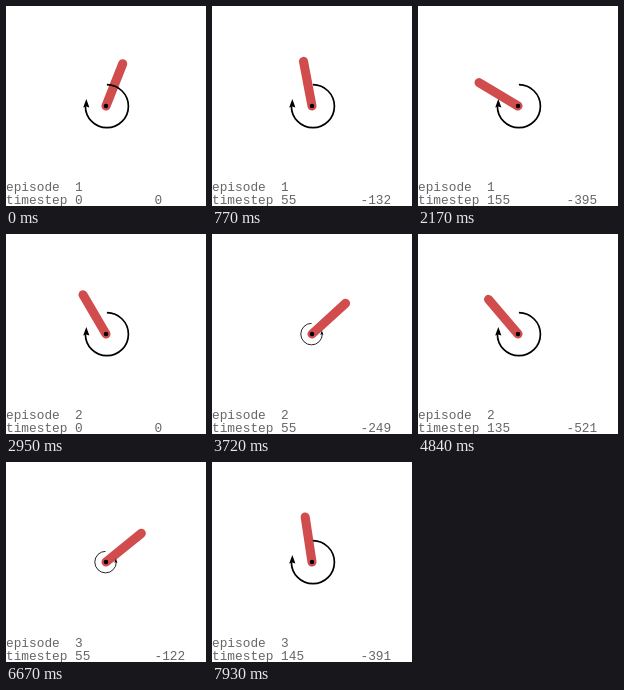
An HTML page with a canvas that plays this animation: 200 by 200 pixels, repeating every 8000 ms.

```html
<!DOCTYPE html>
<html lang="en">
<head>
<meta charset="utf-8">
<title>Pendulum</title>
<style>
  html, body { margin: 0; width: 100%; height: 100%; overflow: hidden; background: #fff; }
  canvas { display: block; width: 200px; height: 200px; }
</style>
</head>
<body>
<canvas id="stage"></canvas>
<script>
const SIZE = 200, MID = 100, UNIT = SIZE / 4.4;
const LOOP = 8000, EPISODE = 2950, TICK = 70, STRIDE = 5, LAST = 195;
const DWELL = 0.25, TURN = 2 * Math.PI, SUB = 20;

// Waypoints per episode: timestep, angle, turns, total reward
const EPISODES = [
  [[0, -0.377, 0, 0], [110, 0.44, 2, -262], [195, 1.28, 4]],
  [[0, 0.53, 0, 0], [55, -0.83, 2, -249], [135, 0.706, 4, -521], [195, 1.28, 5]],
  [[0, -0.4, 0, 0], [55, -0.89, 1, -122], [145, 0.15, 3, -391]]
];

const wrap = a => a - TURN * Math.round(a / TURN);
const clamp = (x, lo, hi) => Math.min(hi, Math.max(lo, x));
const angleOf = p => p[1] + p[2] * TURN;

// Swing speed of a rod that crosses the top at speed v
const speed = (a, v) => Math.sqrt(v * v + 60 * Math.sin((a - DWELL) / 2) ** 2);

function swing(from, steps, v) {
  const h = 0.05 / SUB, path = [from];
  let a = from;
  for (let i = 1; i <= steps * SUB; i++) {
    a += h * speed(a + h / 2 * speed(a, v), v);
    if (i % SUB === 0) path.push(a);
  }
  return { path, v };
}

function fit(from, to, steps) {
  let lo = 0, hi = 8;
  for (let i = 0; i < 44; i++) {
    const v = (lo + hi) / 2;
    if (swing(from, steps, v).path[steps] < to) lo = v; else hi = v;
  }
  return swing(from, steps, (lo + hi) / 2);
}

const cost = (a, v) => wrap(a) ** 2 + 0.1 * speed(a, v) ** 2 + 0.002;

function simulate(points) {
  const states = [{ angle: angleOf(points[0]), reward: 0 }];
  for (let i = 1; i < points.length; i++) {
    const p = points[i - 1], q = points[i];
    const { path, v } = fit(angleOf(p), angleOf(q), q[0] - p[0]);
    const costs = path.slice(0, -1).map(a => cost(a, v));
    const sum = costs.reduce((x, y) => x + y, 0);
    const gain = q[3] === undefined ? 1 : (p[3] - q[3]) / sum;
    let reward = p[3];
    costs.forEach((c, k) => {
      reward -= c * gain;
      states.push({ angle: path[k + 1], reward });
    });
  }
  return states;
}

const runs = EPISODES.map(simulate);
const torque = a => clamp(Math.round(-3 * (wrap(a) + 0.53)), -2, 2);

const canvas = document.getElementById("stage");
const ratio = window.devicePixelRatio || 1;
canvas.width = canvas.height = SIZE * ratio;
const ctx = canvas.getContext("2d");

function drawRod(angle) {
  ctx.strokeStyle = "#d14c4c";
  ctx.lineWidth = 0.2 * UNIT;
  ctx.lineCap = "round";
  ctx.beginPath();
  ctx.moveTo(MID, MID);
  ctx.lineTo(MID - UNIT * Math.sin(angle), MID - UNIT * Math.cos(angle));
  ctx.stroke();
  ctx.fillStyle = "#000";
  ctx.beginPath();
  ctx.arc(MID, MID, 0.05 * UNIT, 0, TURN);
  ctx.fill();
}

function drawArrow(u) {
  if (!u) return;
  ctx.save();
  ctx.translate(MID, MID);
  ctx.scale(-u / 2, Math.abs(u) / 2);
  ctx.strokeStyle = ctx.fillStyle = "#000";
  ctx.lineWidth = 1.7;
  ctx.lineCap = "butt";
  ctx.beginPath();
  ctx.arc(0.9, 0.2, 21.5, -Math.PI / 2, Math.PI);
  ctx.stroke();
  ctx.beginPath();
  ctx.moveTo(-19.7, -7);
  ctx.lineTo(-16.6, 1.4);
  ctx.lineTo(-19.8, 0.4);
  ctx.lineTo(-22.8, 1.6);
  ctx.fill();
  ctx.restore();
}

function drawText(episode, step, reward) {
  ctx.fillStyle = "#666";
  ctx.font = '12.8px "Liberation Mono", "Courier New", monospace';
  ctx.fillText("episode  " + episode, 0, 185);
  ctx.fillText("timestep " + step, 0, 198);
  ctx.fillText(String(Math.round(reward)), 148.5, 198);
}

function draw(time) {
  const n = Math.floor(time / EPISODE);
  const step = Math.min(LAST, STRIDE * Math.floor((time - n * EPISODE) / TICK));
  const { angle, reward } = runs[n][step];
  ctx.setTransform(ratio, 0, 0, ratio, 0, 0);
  ctx.fillStyle = "#fff";
  ctx.fillRect(0, 0, SIZE, SIZE);
  drawRod(angle);
  drawArrow(step ? torque(angle) : -2);
  drawText(n + 1, step, reward);
}

const start = performance.now();
function loop() {
  draw((performance.now() - start) % LOOP);
  requestAnimationFrame(loop);
}
loop();
</script>
</body>
</html>
```
